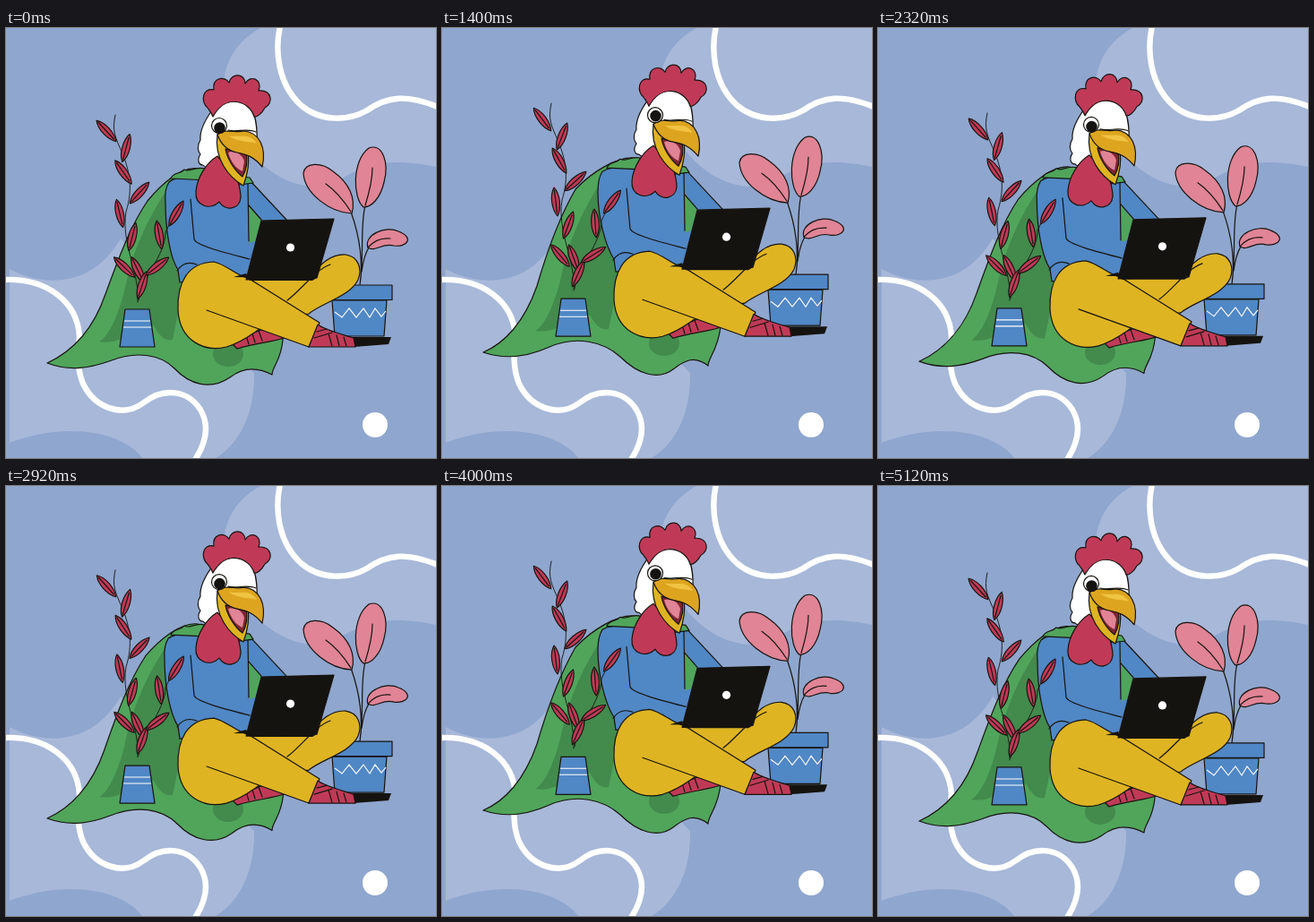
Animation of 480x480 px, one loop 5160 ms. Source, as an HTML page:

```html
<!DOCTYPE html>
<html lang="en">
<head>
<meta charset="utf-8">
<title>Rooster at work</title>
<style>
  html, body { margin: 0; width: 100%; height: 100%; overflow: hidden; background: #8fa6ce; }
  svg { display: block; width: 100vw; height: 100vh; }
  .ink { stroke: #17140f; stroke-width: 1.2; stroke-linejoin: round; stroke-linecap: round; }
  .line { fill: none; }
  .green { fill: #50a55b; }
  .shade { fill: #438a4d; }
  .blue { fill: #5087c5; }
  .yellow { fill: #dfb423; }
  .red { fill: #c03a57; }
  .pink { fill: #e08496; }
  .black { fill: #15130f; }
  .white { fill: #fff; }
  .chalk { fill: none; stroke: #fff; stroke-width: 1.1; }
  .ribbon { fill: none; stroke: #fff; stroke-width: 6.4; }
  .mist { fill: #a7b8d9; }
</style>
</head>
<body>
<svg viewBox="0 0 480 480">
  <rect width="480" height="480" fill="#8fa6ce"/>
  <path class="mist" d="M284 0C258 14 243 38 243 66C247 118 290 176 345 177C385 174 393 137 480 155V0Z"/>
  <path class="mist" d="M4 269C40 288 95 292 128 235L277 385C278 425 264 462 234 480H152C132 452 70 438 4 463Z"/>
  <path class="ribbon" d="M306 -2C300 24 303 62 329 86C351 105 382 104 403 92C426 76 447 74 482 88"/>
  <path class="ribbon" d="M-2 281C45 279 80 305 82 345C80 362 79 380 86 397C99 424 130 436 154 418C176 401 203 404 217 426C227 443 224 462 211 482"/>
  <circle class="white" cx="412" cy="443" r="14"/>

  <g id="scene">
    <g id="cloak">
      <path id="cape" class="ink green"/>
      <path class="shade" d="M182 177C158 212 142 248 134 285C128 315 115 345 104 350C115 352 124 349 132 345L165 332C171 344 178 350 186 348L196 300Z"/>
      <ellipse class="shade" cx="248" cy="364" rx="17" ry="14"/>
    </g>

    <!-- sweater -->
    <path id="sweater" class="ink blue"/>
    <path class="ink green" d="M184 168C187 160 194 164 199 158C205 162 210 154 222 157L226 170Z"/>
    <path class="ink green" d="M258 165L272 167L276 173L260 175Z"/>
    <path class="green" d="M271.5 198L285 215L278 238L271.5 240Z"/>
    <path class="ink line" d="M206 191L210 236C213 243 245 251 272 258M270 174L271 238M271 198L285 214M191 271C197 262 205 261 213 264"/>

    <!-- broad-leaved plant -->
    <path class="ink line" d="M395 287C400 252 391 222 385 205M395 287C400 254 395 222 401 198M397 272C399 257 402 250 405 245"/>
    <path class="ink pink" d="M386 207C361 206 333 184 332 162C334 149 353 150 365 160C383 173 391 190 386 207Z"/>
    <path class="ink pink" d="M399 200C387 190 386 148 405 134C420 128 428 150 422 172C418 190 408 200 399 200Z"/>
    <path class="ink pink" d="M404 245C399 231 424 220 438 227C456 234 448 245 433 243C420 239 412 251 404 245Z"/>
    <path class="ink line" d="M385 205C376 191 367 181 357 174M401 198C405 185 409 169 409 156M404 245C411 237 419 234 429 235"/>
    <path class="ink blue" d="M364 304H425L422 344H367Z"/>
    <rect class="ink blue" x="359" y="287" width="72" height="16.5"/>
    <path class="chalk" d="M367 317L375 323L383 313L391 323L399 313L406 323L412 313L419 322L424 316"/>

    <!-- legs and shoes -->
    <path class="ink red" d="M253 353C257 341 275 344 290 334L313 345C301 350 278 352 258 358Z"/>
    <path class="ink line" d="M268 343L271 353M275 341L278 351M282 338L286 349"/>
    <path class="ink yellow" d="M268 279L340 280C349 263 364 252 379 253C393 255 398 268 393 281C384 300 352 307 338 319L300 325Z"/>
    <path class="ink line" d="M362 264C345 270 331 291 314 304"/>
    <path class="ink yellow" d="M232 261C202 262 191 285 192 315C194 350 222 362 246 356C263 351 274 342 283 336L320 312L270 279C258 277 246 264 232 261Z"/>
    <path class="yellow" d="M270 279L350 329L338 356L224 315Z"/>
    <path class="ink line" d="M270 279L350 329L338 356L224 315"/>
    <path class="black" d="M386 345H430L427 353L388 356Z"/>
    <path class="ink red" d="M348 331C356 337 372 341 388 346L390 356L338 356Z"/>
    <path class="ink line" d="M347 339L358 336M344 346L364 340M360 341L364 355M369 343L372 355M377 345L380 355"/>

    <path class="black" d="M254 278L268 274L272 282H342L347 279Z"/>
    <path class="ink black" d="M285 215L366 213L347 279L268 281Z"/>
    <circle class="white" cx="317.5" cy="245" r="4.6"/>

    <!-- sprig -->
    <path class="ink blue" d="M133 314H160L166 356H127Z"/>
    <path class="chalk" d="M132 327H161M131 334H162"/>
    <g id="sprig"></g>

    <!-- head -->
    <path class="ink white" d="M230 92C222 103 216 114 217 125C213 131 214 138 217 141C213 147 215 153 220 153C224 158 230 155 233 149L246 162L280 132C281 110 279 94 270 84C255 78 238 80 230 92Z"/>
    <path class="ink red" d="M231 99C229 94 227 92 225 89C217 83 219 66 232 69C230 55 244 53 249 61C252 49 267 51 267 62C273 51 287 58 282 70C297 69 299 84 289 89C286 95 280 100 277 99C272 82 246 72 231 99Z"/>
    <path class="ink red" d="M236 143C224 150 213 167 212 183C211 199 228 204 238 194C244 205 261 203 262 189C262 181 260 175 258 168Z"/>
    <path class="ink yellow" d="M236 119C232 146 249 167 265 176C270 162 272 150 270 139Z"/>
    <path class="ink" fill="#7d2532" d="M245 135C247 147 256 160 264 166C269 157 270 148 268 139Z"/>
    <path class="pink" d="M248 139C255 136 264 141 266 149L264 160C257 157 251 150 248 139Z"/>
    <path class="ink" fill="#dda51f" d="M236 119C245 111 256 118 265 115C283 116 291 134 286 155C277 144 269 141 258 139C247 137 240 130 236 119Z"/>
    <path fill="#f0c343" d="M248 120C262 123 272 116 280 129C271 126 258 128 248 120Z"/>
    <path class="ink line" d="M248 114C257 117 269 111 279 116"/>
    <circle class="ink white" cx="238" cy="109" r="8.5"/>
    <circle id="pupil" class="black" cx="238.5" cy="111.5" r="6.3"/>
  </g>
</svg>
<script>
const LOOP = 5160, STEP = 40, BOBS = 2, RISE = 12;
const $ = id => document.getElementById(id);

// Rest and lifted poses share the same path commands.
const poses = {
  cape: [
    "M214 157C195 154 172 176 158 193C138 222 124 262 111 297C97 338 72 362 46 374C72 384 95 379 115 372C145 360 172 364 188 380C205 398 228 405 250 390C268 376 284 380 297 387C297 378 307 372 309 348L280 200Z",
    "M214 157C195 156 168 172 149 192C130 225 117 262 106 300C92 340 70 364 46 374C75 384 100 377 120 368C150 355 180 362 199 379C218 398 241 406 258 393C271 383 282 377 297 389C297 380 308 372 311 345L280 200Z"
  ],
  sweater: [
    "M182 172C190 165 200 168 212 168L272 170C286 185 300 200 314 215L285 278L194 284L192 270C183 256 178 225 178 195C177 185 178 178 182 172Z",
    "M179 172C188 166 200 168 212 168L272 170C286 185 300 200 314 215L285 278L194 284L192 270C183 256 174 225 174 195C174 185 175 178 179 172Z"
  ]
};

function mix([rest, lifted], amount) {
  const ends = lifted.match(/\d+/g);
  let i = 0;
  return rest.replace(/\d+/g, n => (+n + (ends[i++] - n) * amount).toFixed(2));
}

// x, y, angle
const leaves = [
  [112, 115, 47], [134, 134, -75], [131, 161, 55], [149, 184, -48],
  [127, 207, 77], [141, 233, -76], [132, 267, 44], [147, 270, 64],
  [152, 287, -72], [169, 266, -38], [171, 231, 80], [190, 207, -60]
];
const sprig = $("sprig");
sprig.innerHTML =
  '<path class="ink line" style="stroke-width:.9" d="M147 306C150 275 128 240 134 205C142 180 138 160 130 140C122 122 118 115 122 97M148 304C150 281 178 254 178 228L192 200"/>' +
  leaves.map(() => '<path class="ink red" d="M-16 0C-8 -6 8 -5.5 16 0C8 5.5 -8 6 -16 0ZM-13 0H12"/>').join("");
const blades = [...sprig.children].slice(1);

const shift = (id, y) => $(id).setAttribute("transform", `translate(0 ${y})`);

function draw(time) {
  const t = Math.floor(time % LOOP / STEP) * STEP;
  const lift = (1 - Math.cos(2 * Math.PI * BOBS * t / LOOP)) / 2;
  const swell = Math.sin(lift * Math.PI / 2);
  const lead = RISE * (swell - lift); // loose parts run ahead of the body
  shift("scene", -RISE * lift);
  shift("cloak", -lead);
  shift("sprig", -swell - lead);
  shift("pupil", -1.6 * swell);
  for (const id in poses) $(id).setAttribute("d", mix(poses[id], swell));
  leaves.forEach(([x, y, angle], i) =>
    blades[i].setAttribute("transform", `translate(${x} ${y}) rotate(${angle + 6 * swell})`));
}

const start = performance.now();
function tick() {
  draw(performance.now() - start);
  requestAnimationFrame(tick);
}
tick();
</script>
</body>
</html>
```
